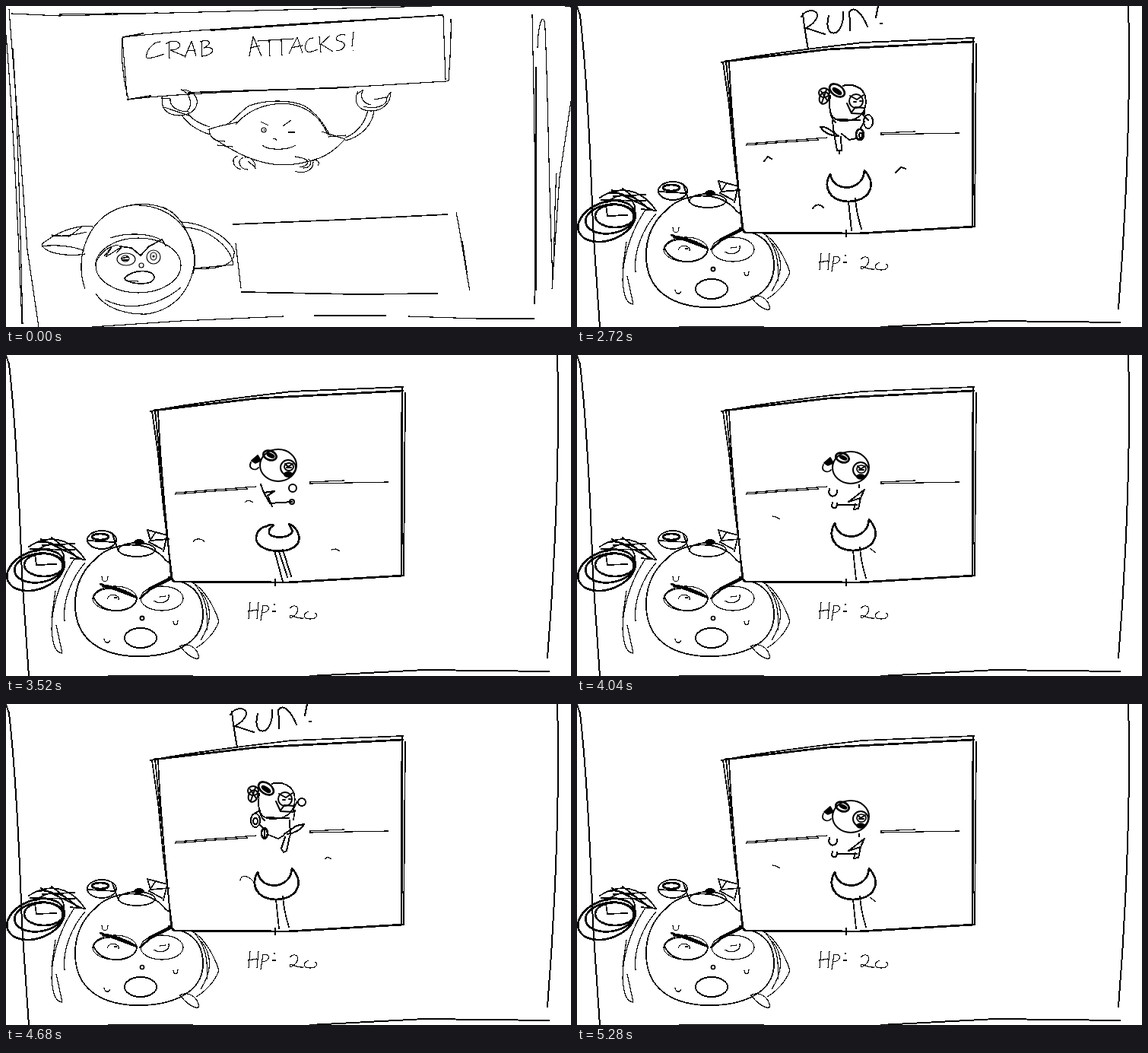
Animation of 743 by 422 pixels, one loop 5400 ms. Source, as an HTML page without scripts:

```html
<!DOCTYPE html>
<html lang="en">
<head>
<meta charset="utf-8">
<title>Crab attack storyboard</title>
<style>
html,body{margin:0;width:100%;height:100%;overflow:hidden;background:#fff}
svg{display:block;width:743px;height:422px;fill:none;stroke:#000;stroke-width:1.15;stroke-linecap:round;stroke-linejoin:round;shape-rendering:crispEdges}
circle,.soft{shape-rendering:auto}
.t{stroke-width:1.2}
.m{stroke-width:2}
.b{stroke-width:2.7}
.k{fill:#000}
.title .m{stroke-width:1.7}
.title,.chase,.ink,.loop,.hold,.pose,.nudge{animation:5.4s step-end infinite}
.title{animation-name:title}
.chase{animation-name:chase}
.ink{animation-name:ink}
.hold{animation-name:hold}
.nudge{animation-name:nudge}
/* the run cycle does not divide the loop, so two copies take turns */
.loop{animation-name:loop;animation-duration:10.8s}
.even{animation-delay:-5.4s}
.pose{animation-duration:240ms;animation-delay:-165ms}
.even .pose{animation-delay:-45ms}
.up1{animation-name:up1}
.up2{animation-name:up2}
.down1{animation-name:down1}
.down2{animation-name:down2}
@keyframes title{0%{opacity:1}41.4%,100%{opacity:0}}
@keyframes chase{0%{opacity:0}41.4%,100%{opacity:1}}
@keyframes ink{0%{stroke-width:1.9}67.3%,100%{stroke-width:1.7}}
@keyframes loop{0%{opacity:0}20.7%{opacity:1}48.85%,100%{opacity:0}}
@keyframes hold{0%{opacity:0}97.7%,100%{opacity:1}}
@keyframes nudge{0%,59%,77%{transform:none}50.3%,68%,86%{transform:translateX(4px)}100%{transform:none}}
@keyframes up1{0%{opacity:1}16.667%{opacity:0}83.333%,100%{opacity:1}}
@keyframes up2{0%{opacity:0}16.667%{opacity:1}33.333%,100%{opacity:0}}
@keyframes down1{0%{opacity:0}33.333%{opacity:1}50%,100%{opacity:0}}
@keyframes down2{0%{opacity:0}50%{opacity:1}83.333%,100%{opacity:0}}
</style>
</head>
<body>
<svg viewBox="0 0 743 422" role="img" aria-label="Crab attacks! Run! HP: 20">
<defs>
  <g id="run" class="m">
    <path d="M297 10C298 22 301 40 304 57M295 14C301 3 318 4 316 14C313 22 305 27 301 29L326 37"/>
    <path d="M331 13C327 28 331 38 341 35C348 30 351 18 350 8M359 32C360 22 358 14 358 8C364 -1 374 8 382 27M396 0L393 15M399 23h2"/>
  </g>
  <g id="claw">
    <path class="b" d="M329 221C319 238 328 256 352 257C380 257 392 236 374 216C373 228 367 235 356 238C344 240 332 236 329 221"/>
    <path d="M353 257L357 295M362 253C363 268 366 280 370 293"/>
  </g>
  <g id="front">
    <path d="M333 118C330 140 334 152 352 151C372 151 383 138 379 118C375 107 362 101 350 105"/>
    <path d="M352 104C365 102 375 108 378 116M332 132C333 144 336 150 340 153M343 149L372 150"/>
    <g class="b soft">
      <ellipse cx="342" cy="111" rx="11" ry="7" transform="rotate(35 342 111)"/>
      <ellipse class="k" cx="342" cy="112" rx="6" ry="2" transform="rotate(35 342 112)"/>
    </g>
    <g class="m soft">
      <ellipse cx="325" cy="114" rx="7" ry="6"/>
      <ellipse cx="325" cy="121" rx="6" ry="8" transform="rotate(25 325 121)"/>
      <path d="M321 112L329 124M328 110L322 127"/>
      <ellipse cx="367" cy="125" rx="9" ry="9"/>
      <path d="M359 118L368 123L377 117M364 126h3M372 125h2M355 128L361 141L378 142V134L366 133L361 140"/>
    </g>
  </g>
  <g id="side" class="soft">
    <ellipse class="m" cx="358" cy="145" rx="24" ry="21"/>
    <ellipse class="b" cx="347" cy="132" rx="9" ry="6" transform="rotate(20 347 132)"/>
    <ellipse class="k" cx="348" cy="132" rx="5" ry="2" transform="rotate(25 348 132)"/>
    <path class="k" d="M323 139L331 132L335 139L328 142Z"/>
    <path d="M322 141C318 150 328 153 332 148"/>
    <ellipse class="m" cx="371" cy="148" rx="10" ry="10"/>
    <ellipse cx="372" cy="147" rx="6" ry="5"/>
    <path class="m" d="M367 143l4 4l6 -4M369 148h6"/>
    <ellipse class="k" cx="371" cy="157" rx="5" ry="3"/>
  </g>
  <g id="left">
    <use href="#run"/><use href="#front"/>
    <ellipse class="m" cx="383" cy="152" rx="6" ry="9"/>
    <path d="M336 151L338 168M376 143L383 150M348 168L358 176L367 174M378 152L372 162"/>
    <path class="m" d="M320 159C326 157 336 165 344 171C336 171 326 168 320 159M339 173L342 190H348L347 172M345 190v4"/>
    <ellipse class="b" cx="372" cy="169" rx="5" ry="7"/>
    <ellipse cx="373" cy="170" rx="2" ry="3"/>
    <path d="M246 204L251 198L256 201M419 219L426 212L432 214M310 266C314 260 320 260 324 265"/>
  </g>
  <g id="right">
    <use href="#run"/><use href="#front"/><use href="#claw" x="2"/>
    <ellipse class="m" cx="389" cy="129" rx="5" ry="5"/>
    <ellipse class="m" cx="328" cy="153" rx="6" ry="9"/>
    <ellipse class="m" cx="328" cy="154" rx="3" ry="4"/>
    <ellipse class="b" cx="340" cy="170" rx="4" ry="7"/>
    <path d="M340 166V174M383 128L379 136M328 143L334 140M333 158L339 164M345 172L358 177L365 173M380 140L378 152"/>
    <path class="m" d="M366 171L382 160L392 158C388 166 378 170 370 171M367 175L362 190L365 195L369 193L373 174M373 153L374 172"/>
    <path class="t" d="M308 232C309 223 319 226 325 233M419 204L423 201L428 204"/>
  </g>
  <g id="land">
    <use href="#side"/>
    <path class="m" d="M335 170L339 181L353 179L344 185L350 199M339 181L347 195L376 193"/>
    <circle class="m" cx="377" cy="175" r="5"/><circle class="m" cx="376" cy="193" r="3"/>
    <path class="b" d="M343 225C328 228 324 245 336 252C350 262 390 260 385 237C383 230 378 224 372 222L377 232C370 243 350 240 346 235C345 229 348 226 352 224C349 222 346 223 343 225"/>
    <path d="M353 257L364 298M359 258L370 292M364 256L375 291"/>
    <path class="t" d="M246 246C249 240 258 241 261 246M314 194C317 190 321 191 325 194M428 256L434 255L439 258"/>
  </g>
  <g id="push">
    <use href="#side" x="2" y="3"/><use href="#claw" x="10"/>
    <path class="m" d="M332 176C328 188 343 189 342 178M343 197L368 197M336 194C332 203 343 204 342 195M371 171V174M378 177L357 193L373 188L378 177M373 188L370 202L364 203L366 196"/>
    <path class="t" d="M257 212L262 213L267 216M385 254L393 260"/>
  </g>
</defs>

<g class="title">
  <!-- page border -->
  <path d="M7 10L70 13L330 6L560 0M70 11L200 9M735 0L743 1M4 4C8 60 20 200 28 320L43 422M9 56C14 120 17 220 22 418M0 38C8 130 16 290 21 418"/>
  <path d="M113 422L230 414L365 408M405 407H500M529 408L620 411H695M692 11C694 120 697 200 695 392M697 80V374"/>
  <path d="M699 55C700 18 708 5 709 30C713 120 714 250 719 360C722 310 721 260 724 220M743 125L728 225L718 372"/>
  <!-- caption box -->
  <path d="M153 42C151 70 155 100 161 123M153 42L159 118M575 13L578 97M585 17C586 50 583 80 582 98L576 100"/>
  <path class="m" d="M154 41L180 36M270 32C380 25 480 19 574 12M160 123L190 118M240 114C330 110 420 109 450 107"/>
  <path d="M154 41C220 33 380 23 574 12M160 123C250 112 400 110 496 104L578 99"/>
  <path d="M203 47C193 47 183 60 185 68C190 70 200 66 208 63M214 47L215 69M210 50C222 42 231 48 228 54C224 58 218 58 216 58L235 66"/>
  <path d="M235 68L244 46L250 66M238 59L249 58M257 46L258 67M255 47C268 42 272 50 260 55C276 52 276 64 258 66"/>
  <path d="M320 66L325 40L336 66M321 55L334 52M331 46L378 43M346 46L347 66M362 45L363 65M372 63L383 41L390 62M375 55L390 52"/>
  <path d="M404 42C394 42 391 56 396 60C401 61 406 59 410 57M412 40L414 61M426 39L414 50L430 60M446 38C436 36 430 44 438 46C450 48 446 58 434 59M457 34L455 53M456 58l1 1"/>
  <!-- crab -->
  <path d="M289 156C300 152 308 138 320 131C345 122 375 124 392 131C410 142 418 155 427 172M302 156C325 128 370 120 398 138C412 147 418 158 424 170"/>
  <path d="M265 163C285 155 297 156 305 152M267 162C268 175 276 178 288 178M270 172C300 192 320 202 345 207C370 212 395 206 412 200C425 195 438 184 446 175M415 165L446 175M424 172L447 170M278 183L298 185"/>
  <path d="M335 152L345 157M364 158L375 150M351 175q3 -2 5 2M337 183C345 190 370 190 381 183"/>
  <path class="m" d="M372 166h7"/><circle cx="339" cy="163" r="3"/><path d="M339 163h1"/>
  <path d="M305 197C295 200 298 212 309 215M312 199C302 203 308 215 318 215M314 199C322 198 328 203 328 214M318 204L328 212M380 198L390 200C401 203 398 210 386 212M380 217C392 222 405 215 404 205M391 213C402 213 403 203 397 201M402 204C410 200 413 206 410 210"/>
  <path d="M231 143C238 155 250 163 268 169M239 141C245 150 255 155 268 159M206 119C203 130 208 139 217 142C225 145 235 144 243 140C258 130 252 110 230 110M204 121L216 122C215 132 225 139 240 139M230 110C244 115 246 132 237 139M208 133L243 145"/>
  <path d="M484 138C482 155 468 172 446 177M476 137C472 155 460 168 446 173M463 112C456 126 463 138 480 138C495 138 506 128 506 113M461 116L470 110C464 120 470 128 480 130M470 132C485 136 502 132 501 120L506 113M484 123L500 120"/>
  <!-- hero -->
  <path d="M104 372C88 330 110 268 165 262C225 258 258 310 246 352M116 290C140 258 190 252 220 272M130 386C160 402 200 395 230 370M118 378C130 398 160 406 185 405C220 400 244 375 248 335M205 264C235 275 252 320 247 345"/>
  <path d="M114 290C85 287 60 303 47 313C50 325 80 330 104 326M47 316C65 313 90 316 103 322M100 290L83 303L60 301M60 303C75 302 90 302 106 297"/>
  <path d="M231 284C255 285 290 300 300 322C302 338 285 347 247 345M235 291C265 292 295 315 299 340L247 345"/>
  <ellipse cx="174" cy="341" rx="56" ry="36"/>
  <path d="M117 340C123 325 133 316 148 314M137 305C160 297 190 299 205 308M129 329L139 317L131 330L153 316L145 325"/>
  <path class="m" d="M150 316L165 318L177 328L188 316L205 307L210 315M152 332l8 -2"/>
  <g class="soft">
    <ellipse cx="158" cy="333" rx="12" ry="8"/><ellipse cx="157" cy="332" rx="5" ry="4"/>
    <ellipse cx="194" cy="330" rx="9" ry="9"/><ellipse cx="194" cy="329" rx="4" ry="5"/>
    <circle class="k" cx="194" cy="329" r="1"/><circle cx="178" cy="341" r="3"/>
  </g>
  <path class="m" d="M156 358C165 346 194 345 195 357C193 368 166 366 157 360"/>
  <path d="M158 361L174 362M152 334h9"/>
  <!-- speech box -->
  <path class="m" d="M299 287L440 281L580 274M310 376L460 379L567 378M600 310L606 350"/>
  <path d="M302 312L309 371M592 271C598 300 604 345 610 374"/>
</g>

<g class="chase"><g class="ink">
  <!-- page border and panel -->
  <path class="m" d="M0 1L4 12C14 100 18 200 21 290L30 422M725 0C728 100 724 250 712 398M400 422L550 414L714 416"/>
  <path class="t" d="M135 421.5H245"/>
  <path d="M190 74C250 62 320 55 375 48L522 42M192 74L200 130L207 200L219 297M200 72C203 150 212 230 217 293M196 73L206 170L214 255M525 50L523 290"/>
  <path class="b" d="M194 73L330 57L522 47M521 44L520 290M214 292L222 298L370 299L523 290"/>
  <path class="t" d="M354 294V304M223 181L329 173M222 183L275 179L318 176M399 169L503 167M399 167L445 165"/>
  <!-- hp label -->
  <path class="t" d="M321 325L319 347M318 337L330 335M332 325L330 347M338 329L335 349M337 330C349 327 348 338 337 339M350 337h5M352 328h2"/>
  <path class="t" d="M373 333C380 326 388 332 381 341C376 346 371 348 374 342C380 344 386 347 391 346M398 337C390 340 390 347 400 347C408 347 412 341 406 339"/>
  <!-- close-up face -->
  <path d="M118 268C97 285 90 310 91 332C93 375 125 393 165 396C215 398 256 382 259 345C260 320 250 305 230 298M118 268C140 244 190 242 210 270L213 272"/>
  <g class="b">
    <ellipse cx="39" cy="283" rx="39" ry="25" transform="rotate(-20 39 283)"/>
    <ellipse cx="43" cy="280" rx="32" ry="19" transform="rotate(-8 43 280)"/>
    <ellipse cx="50" cy="276" rx="26" ry="15"/>
    <path d="M127 304C143 305 158 310 171 318M132 303L150 308M124 301L172 319M176 320L190 308L218 294M188 307L214 294"/>
  </g>
  <path d="M30 252C55 235 85 240 104 269L85 267M46 242L99 268M60 240L94 266M40 258C60 240 80 252 95 268M48 250L90 248M43 246C65 243 78 258 76 270M32 255L90 256M38 262L40 276L66 275"/>
  <ellipse cx="126" cy="243" rx="19" ry="12"/><ellipse class="b" cx="124" cy="239" rx="11" ry="4"/>
  <path d="M140 236L148 258M107 244L143 246M186 230L212 237L207 258M186 230L190 244L214 242M196 234L188 246L205 255"/>
  <ellipse class="k" cx="175" cy="246" rx="6" ry="3"/><ellipse cx="172" cy="256" rx="24" ry="9"/>
  <g class="t">
    <path d="M90 268C75 290 60 325 60 360C61 380 65 392 74 392L66 355M104 273C85 295 74 325 77 350M65 310L60 345"/>
    <path d="M240 297C262 305 275 335 280 350C275 365 262 378 250 385M257 312C271 330 272 350 256 375M248 301C262 318 266 335 264 362M228 382C238 395 250 402 254 398C252 387 242 376 228 383"/>
    <ellipse cx="143" cy="320" rx="29" ry="16"/><ellipse cx="205" cy="320" rx="28" ry="16"/>
    <path d="M133 321C136 311 151 316 148 322M142 319h4M194 323C204 329 216 324 214 315M202 318L210 317"/>
    <path d="M126 291c0 9 8 9 8 0M220 350c0 5 6 7 6 -1M129 373c1 7 7 6 8 2"/>
  </g>
  <path d="M115 318C120 305 150 300 172 320C170 340 125 344 115 318"/>
  <circle cx="179" cy="346" r="2.5"/><ellipse class="m" cx="177" cy="372" rx="21" ry="13"/>
  <!-- runner -->
  <g class="loop">
    <use class="pose up1" href="#left"/><g class="nudge"><use class="pose up1" href="#claw"/></g>
    <use class="pose up2" href="#right"/><use class="pose down1" href="#land"/><use class="pose down2" href="#push"/>
  </g>
  <g class="loop even">
    <use class="pose up1" href="#left"/><g class="nudge"><use class="pose up1" href="#claw"/></g>
    <use class="pose up2" href="#right"/><use class="pose down1" href="#land"/><use class="pose down2" href="#push"/>
  </g>
  <use class="hold" href="#push"/>
</g></g>
</svg>
</body>
</html>
```
